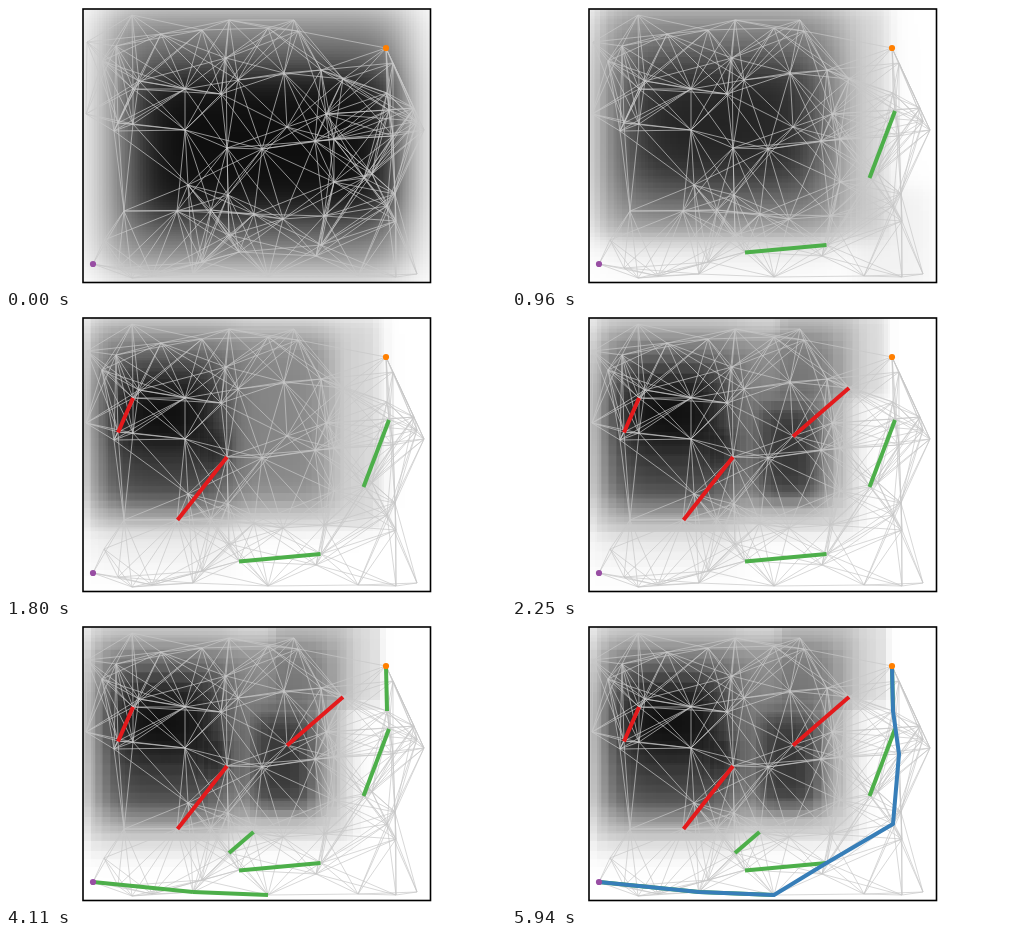
These frames come from a looping animation (500 px wide and 281 px high, 5.97 s). An HTML page with a canvas:

```html
<!DOCTYPE html>
<html lang="en">
<head>
<meta charset="utf-8">
<title>Roadmap search</title>
<style>
  html, body { margin: 0; width: 100%; height: 100%; overflow: hidden; background: #fff; }
  canvas { display: block; width: 500px; height: 281px; }
</style>
</head>
<body>
<canvas id="stage" width="500" height="281"></canvas>
<script>
const LOOP = 5970;
const FRAME = { x: 77, y: 3, w: 347.5, h: 273.5 };
const GREEN = '#4daf4a', RED = '#e41a1c', BLUE = '#377eb8';
const START = [87, 258], GOAL = [380, 42];
const REACH = 92;

const nodes = [
  START, GOAL, [126, 9], [81, 36], [96, 55], [110, 40], [155, 28], [196, 24], [223, 14],
  [262, 22], [288, 14], [292, 25], [220, 52], [278, 67], [315, 64], [337, 73], [232, 74],
  [215, 88], [179, 83], [133, 75], [127, 83], [80, 108], [112, 117], [127, 118], [108, 125],
  [179, 124], [221, 142], [256, 143], [281, 121], [309, 135], [328, 133], [320, 108],
  [387, 57], [381, 87], [383, 104], [408, 102], [411, 115], [418, 124], [387, 130],
  [358, 172], [328, 176], [366, 168], [389, 188], [381, 200], [390, 215], [411, 268],
  [390, 271], [352, 270], [315, 239], [318, 210], [277, 213], [248, 208], [223, 229],
  [233, 246], [262, 271], [187, 268], [196, 256], [205, 204], [171, 205], [182, 179],
  [222, 189], [118, 205], [98, 234], [112, 262], [126, 272], [146, 270], [310, 250]
];

function randomFrom(seed) {
  return () => {
    seed = (Math.imul(seed, 1664525) + 1013904223) >>> 0;
    return seed / 4294967296;
  };
}

const sigmoid = v => 1 / (1 + Math.exp(-v));

// A soft-edged rectangle of collision probability.
const patch = (x0, y0, x1, y1, soft, weight) => ({ x0, y0, x1, y1, soft, weight });

const deep = patch(113, 65, 203, 132, 11, .84);
const mid = patch(102, 45, 217, 190, 11, .5);
const halo = patch(90, 18, 324, 190, 9, .37);
const wide = patch(82, 2, 374, 212, 5, .16);
const base = patch(80, -10, 230, 252, 8, .06);
const faint = patch(345, 182, 418, 285, 6, .05);
const pocket = patch(198, 116, 222, 152, 5, .5);
const east = patch(248, 90, 305, 183, 7, .62);
const shelf = patch(82, 2, 346, 218, 5, .14);
const northEast = patch(268, 0, 374, 82, 3, .14);

const heats = {
  prior: [patch(133, 64, 385, 212, 12, .88), patch(100, 5, 400, 262, 14, .55)],
  eastFree: [patch(128, 65, 312, 200, 12, .85), patch(92, 0, 342, 268, 14, .5),
             patch(85, -10, 378, 285, 4, .12), patch(345, 182, 418, 285, 6, .08)],
  southFree: [patch(118, 55, 300, 180, 14, .72), patch(92, 5, 330, 225, 14, .45),
              patch(85, 0, 376, 232, 5, .13), faint],
  westBlocked: [deep, mid, halo, wide, base, faint],
  middleBlocked: [deep, mid, halo, wide, base, pocket],
  eastBlocked: [deep, mid, halo, shelf, base, pocket, east, northEast],
  settled: [deep, mid, halo, shelf, pocket, east, northEast, patch(80, -10, 225, 236, 4, .05)]
};

const steps = [
  { at: 0, heat: 'prior', grain: 3 },
  { at: 450, heat: 'eastFree', grain: 5, color: GREEN, line: [[357.5, 172], [383, 105]] },
  { at: 900, heat: 'southFree', grain: 6, color: GREEN, line: [[233, 246.5], [314.5, 239]] },
  { at: 1350, heat: 'westBlocked', grain: 7, color: RED, line: [[112, 117.5], [127, 83]] },
  { at: 1800, heat: 'middleBlocked', grain: 8, color: RED, line: [[171.5, 205], [221, 142]] },
  { at: 2250, heat: 'eastBlocked', grain: 10, color: RED, line: [[281, 121.5], [337, 73]] },
  { at: 2700, heat: 'settled', grain: 10, color: GREEN, line: [[223, 229], [247.5, 208]] },
  { at: 3150, heat: 'settled', color: GREEN, line: [START, [187, 268]] },
  { at: 3600, heat: 'settled', color: GREEN, line: [GOAL, [381, 87]] },
  { at: 4050, heat: 'settled', color: GREEN, line: [[187, 268], [262, 271]] },
  { at: 4500, heat: 'settled', color: BLUE,
    line: [START, [187, 268], [262, 271], [314.5, 239], [381, 200], [387, 130], [381, 87], GOAL] }
];

// Profile of one patch along an axis, held constant over short random runs.
function profile(from, length, lo, hi, soft, grain, random) {
  const values = new Float32Array(length);
  for (let i = 0; i < length;) {
    const run = 1 + Math.floor(random() * grain);
    const p = from + i + run / 2;
    values.fill(sigmoid((p - lo) / soft) * sigmoid((hi - p) / soft), i, i + run);
    i += run;
  }
  return values;
}

function paintHeat(patches, grain) {
  const w = Math.ceil(FRAME.w), h = Math.ceil(FRAME.h);
  const random = randomFrom(17);
  const light = new Float32Array(w * h).fill(255);
  for (const p of patches) {
    const across = profile(FRAME.x, w, p.x0, p.x1, p.soft, grain, random);
    const down = profile(FRAME.y, h, p.y0, p.y1, p.soft, grain, random);
    for (let i = 0; i < light.length; i++)
      light[i] *= 1 - p.weight * across[i % w] * down[Math.floor(i / w)];
  }
  const sheet = document.createElement('canvas');
  sheet.width = w;
  sheet.height = h;
  const pen = sheet.getContext('2d');
  const image = pen.createImageData(w, h);
  light.forEach((v, i) => image.data.set([v, v, v, 255], i * 4));
  pen.putImageData(image, 0, 0);
  return sheet;
}

const sheets = {};
for (const { heat, grain } of steps)
  sheets[heat] = sheets[heat] || paintHeat(heats[heat], grain);

const roadmap = new Path2D();
nodes.forEach((a, i) => {
  for (const b of nodes.slice(i + 1)) {
    if (Math.hypot(a[0] - b[0], a[1] - b[1]) > REACH) continue;
    roadmap.moveTo(...a);
    roadmap.lineTo(...b);
  }
});

const ctx = document.getElementById('stage').getContext('2d');

function drawLine({ line, color }) {
  ctx.beginPath();
  line.forEach(p => ctx.lineTo(...p));
  ctx.strokeStyle = color;
  ctx.lineWidth = 4;
  ctx.lineJoin = 'round';
  ctx.stroke();
}

function drawDot([x, y], color) {
  ctx.beginPath();
  ctx.arc(x, y, 3.1, 0, 2 * Math.PI);
  ctx.fillStyle = color;
  ctx.fill();
}

function draw(count) {
  ctx.fillStyle = '#fff';
  ctx.fillRect(0, 0, 500, 281);
  ctx.drawImage(sheets[steps[count - 1].heat], FRAME.x, FRAME.y);
  ctx.strokeStyle = '#c8c8c8';
  ctx.lineWidth = .7;
  ctx.stroke(roadmap);
  steps.slice(1, count).forEach(drawLine);
  drawDot(START, '#984ea3');
  drawDot(GOAL, '#ff7f00');
  ctx.strokeStyle = '#000';
  ctx.lineWidth = 1.6;
  ctx.lineJoin = 'miter';
  ctx.strokeRect(FRAME.x, FRAME.y, FRAME.w, FRAME.h);
}

const began = performance.now();
let shown = 0;

function tick() {
  const t = (performance.now() - began) % LOOP;
  const count = steps.filter(s => s.at <= t).length;
  if (count !== shown) draw(shown = count);
  requestAnimationFrame(tick);
}
tick();
</script>
</body>
</html>
```
